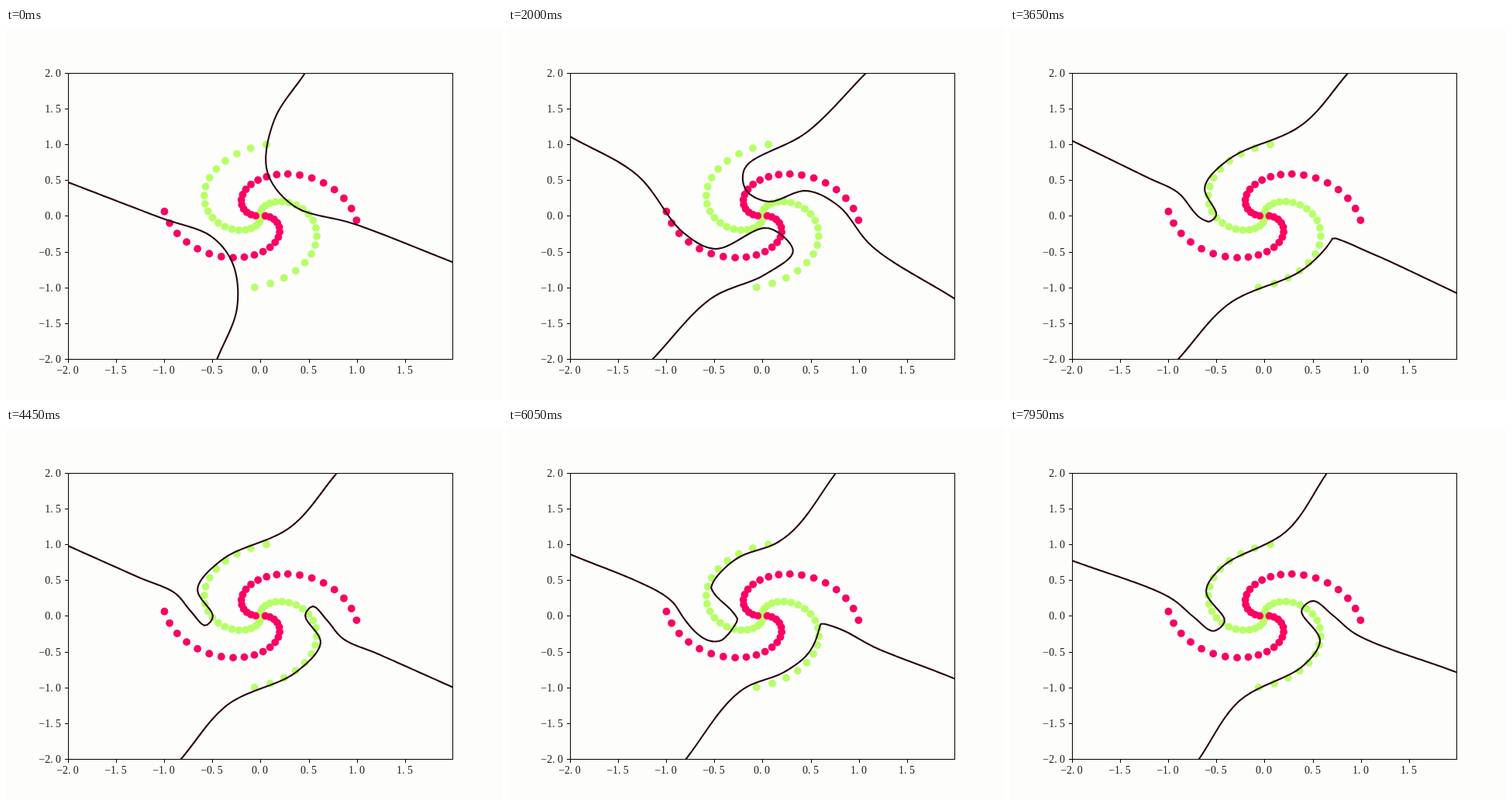
An HTML page that plays this animation: 640 by 480 pixels, repeating every 8000 ms.

```html
<!DOCTYPE html>
<html lang="en">
<head>
<meta charset="utf-8">
<title>Spiral decision boundary</title>
<style>
  html, body { margin: 0; width: 100%; height: 100%; overflow: hidden; background: #fdfdfb; }
  svg { display: block; width: 640px; height: 480px; }
  text { font: 13.9px "Liberation Serif", "Noto Serif", serif; fill: #1c1c1c; }
  .axes { fill: none; stroke: #000; stroke-width: 1; }
  #boundary { fill: none; stroke: #280612; stroke-width: 2.1; stroke-linecap: round; }
</style>
</head>
<body>
<svg viewBox="0 0 640 480">
  <defs><clipPath id="plot"><rect x="80" y="58" width="497" height="370"/></clipPath></defs>
  <g id="dots"></g>
  <path id="boundary" clip-path="url(#plot)"/>
  <rect class="axes" x="80.5" y="58.5" width="496" height="369"/>
  <g id="ticks"></g>
</svg>
<script>
const LOOP = 8000, STEP = 50;
const LEFT = 80, TOP = 58, WIDTH = 496, HEIGHT = 370;
const CELL = 4, COLS = WIDTH / CELL + 1, ROWS = Math.ceil(HEIGHT / CELL) + 1;
const toX = v => 328.4 + v * 124.2, toY = v => 242.4 - v * 92.4;

function add(parent, tag, attrs, text = "") {
  const node = document.createElementNS("http://www.w3.org/2000/svg", tag);
  for (const key in attrs) node.setAttribute(key, attrs[key]);
  node.textContent = text;
  document.getElementById(parent).append(node);
}

// Axes; dx widens the gap after the decimal point
function tickLabel(v, x, y, anchor) {
  const dx = v < 0 ? "0 0 0 3.4" : "0 0 3.4";
  add("ticks", "text", { x, y, dx, "text-anchor": anchor }, v.toFixed(1).replace("-", "\u2212"));
}
for (let v = -2; v <= 2; v += 0.5) {
  const x = Math.round(toX(v)) + 0.5, y = Math.round(toY(v)) + 0.5;
  add("ticks", "path", { class: "axes", d: `M80 ${y}h-4` });
  tickLabel(v, 71, y + 4, "end");
  if (v === 2) continue;
  add("ticks", "path", { class: "axes", d: `M${x} 428v4` });
  tickLabel(v, x - 1, 446, "middle");
}

// Four spiral arms, a quarter turn apart
function arm(fill, turn) {
  for (let i = 1; i <= 20; i++) {
    const r = i / 20, angle = (80.5 + turn + 193 * r) * Math.PI / 180;
    add("dots", "circle", { cx: toX(r * Math.sin(angle)), cy: toY(r * Math.cos(angle)), r: 4.9, fill });
  }
}
for (const turn of [90, 270]) arm("#b6ff66", turn);
for (const turn of [0, 180]) arm("#fb0062", turn);

// Centripetal Catmull-Rom curve, extended straight past both ends
function spline(p) {
  const beyond = (a, b) => [2 * a[0] - b[0], 2 * a[1] - b[1]];
  const span = (a, b) => Math.sqrt(Math.hypot(b[0] - a[0], b[1] - a[1]));
  const n = p.length;
  const q = [beyond(p[0], p[1]), ...p, beyond(p[n - 1], p[n - 2])];
  const out = [q[0]];
  for (let i = 1; i < n; i++) {
    const [a, b, c, e] = q.slice(i - 1, i + 3);
    const before = span(a, b), here = span(b, c), after = span(c, e);
    for (let t = 0; t < 0.99; t += 0.1) {
      out.push([0, 1].map(d => {
        const chord = c[d] - b[d];
        const m = chord + here * ((b[d] - a[d]) / before - (c[d] - a[d]) / (before + here));
        const k = chord + here * ((e[d] - c[d]) / after - (e[d] - b[d]) / (here + after));
        return b[d] + t * (m + t * (3 * chord - 2 * m - k + t * (m + k - 2 * chord)));
      }));
    }
  }
  out.push(q[n], q[n + 1]);
  return out;
}

function inside(x, y, poly) {
  let hit = false;
  for (let i = 0, j = poly.length - 1; i < poly.length; j = i++) {
    const [ax, ay] = poly[i], [bx, by] = poly[j];
    if (ay > y !== by > y && x < ax + (y - ay) / (by - ay) * (bx - ax)) hit = !hit;
  }
  return hit;
}

function distance(x, y, line) {
  let best = Infinity;
  for (let i = 1; i < line.length; i++) {
    const [ax, ay] = line[i - 1], dx = line[i][0] - ax, dy = line[i][1] - ay;
    const t = Math.max(0, Math.min(1, ((x - ax) * dx + (y - ay) * dy) / (dx * dx + dy * dy)));
    const ex = x - ax - t * dx, ey = y - ay - t * dy;
    best = Math.min(best, ex * ex + ey * ey);
  }
  return Math.sqrt(best);
}

// Each pose is a signed distance field: blending fields lets the curves reconnect.
// A pose with one curve repeats it, turned by half around the middle.
const poses = [];
const halfTurn = points => points.map(([x, y]) => [653 - x, 485 - y]);
function pose(time, sign, corners, first, second = halfTurn(first)) {
  const lines = [spline(first), spline(second)];
  const regions = lines.map((line, i) => [...line, corners[i]]);
  const field = new Float32Array(COLS * ROWS);
  for (let i = 0; i < field.length; i++) {
    const x = LEFT + i % COLS * CELL, y = TOP + Math.floor(i / COLS) * CELL;
    const gap = Math.min(...lines.map(line => distance(x, y, line)));
    field[i] = regions.some(poly => inside(x, y, poly)) ? sign * gap : -sign * gap;
  }
  poses.push({ time, field });
}
const centreOpen = (time, left, right) => pose(time, -1, [[-100, 600], [740, -100]], left, right);
const centreCut = (time, upper, lower) => pose(time, 1, [[-100, -100], [740, 600]], upper, lower);

centreOpen(0,
  [[80, 199], [200, 245], [265, 269], [293, 305], [298, 362], [272, 428]],
  [[386, 58], [346, 119], [337, 185], [372, 230], [450, 253], [576, 302]]);
centreOpen(2000,
  [[80, 140], [167, 190], [225, 263], [268, 285], [335, 258], [368, 288], [330, 319], [262, 349], [186, 428]],
  [[462, 58], [385, 135], [306, 180], [307, 209], [336, 224], [385, 210], [427, 230], [470, 282], [576, 349]]);
centreCut(2900,
  [[445, 58], [385, 124], [290, 166], [255, 203], [266, 241], [245, 245], [216, 212], [180, 192], [80, 139]],
  [[208, 428], [280, 354], [375, 313], [424, 280], [470, 297], [576, 349]]);
centreCut(4450,
  [[427, 58], [367, 128], [280, 169], [247, 208], [267, 243], [257, 255], [238, 236], [218, 213], [172, 193], [80, 152]]);
centreCut(5350,
  [[424, 58], [367, 128], [280, 169], [248, 207], [277, 243], [262, 264], [237, 242], [219, 217], [170, 195], [80, 157]],
  [[228, 428], [295, 350], [385, 308], [430, 278], [480, 292], [576, 329]]);
centreOpen(6800,
  [[80, 169], [188, 215], [236, 273], [278, 290], [327, 254], [376, 277], [352, 311], [300, 331], [230, 428]]);
centreCut(7950,
  [[409, 58], [357, 133], [275, 178], [253, 211], [277, 249], [262, 262], [236, 243], [205, 218], [80, 171]]);

// Marching squares along the zero level
const CORNERS = [[0, 0], [1, 0], [1, 1], [0, 1]];
function contour(value) {
  let d = "";
  for (let r = 0; r < ROWS - 1; r++) {
    for (let c = 0; c < COLS - 1; c++) {
      const v = CORNERS.map(([x, y]) => value((r + y) * COLS + c + x));
      const cuts = [];
      for (let k = 0; k < 4; k++) {
        const m = (k + 1) % 4;
        if (v[k] > 0 === v[m] > 0) continue;
        const t = v[k] / (v[k] - v[m]);
        const [ax, ay] = CORNERS[k], [bx, by] = CORNERS[m];
        const x = LEFT + (c + ax + t * (bx - ax)) * CELL, y = TOP + (r + ay + t * (by - ay)) * CELL;
        cuts.push(x.toFixed(2) + " " + y.toFixed(2));
      }
      for (let k = 0; k < cuts.length; k += 2) d += `M${cuts[k]}L${cuts[k + 1]}`;
    }
  }
  return d;
}

const boundary = document.getElementById("boundary");
let shown = -1;
function draw() {
  const time = Math.floor(performance.now() % LOOP / STEP) * STEP;
  if (time !== shown) {
    shown = time;
    let i = 0;
    while (i < poses.length - 2 && time >= poses[i + 1].time) i++;
    const a = poses[i], b = poses[i + 1];
    let mix = (time - a.time) / (b.time - a.time);
    if (i === 0) mix = 1 - (1 - mix) ** 1.6; // fast start, then settling
    boundary.setAttribute("d", contour(k => a.field[k] + (b.field[k] - a.field[k]) * mix));
  }
  requestAnimationFrame(draw);
}
draw();
</script>
</body>
</html>
```
